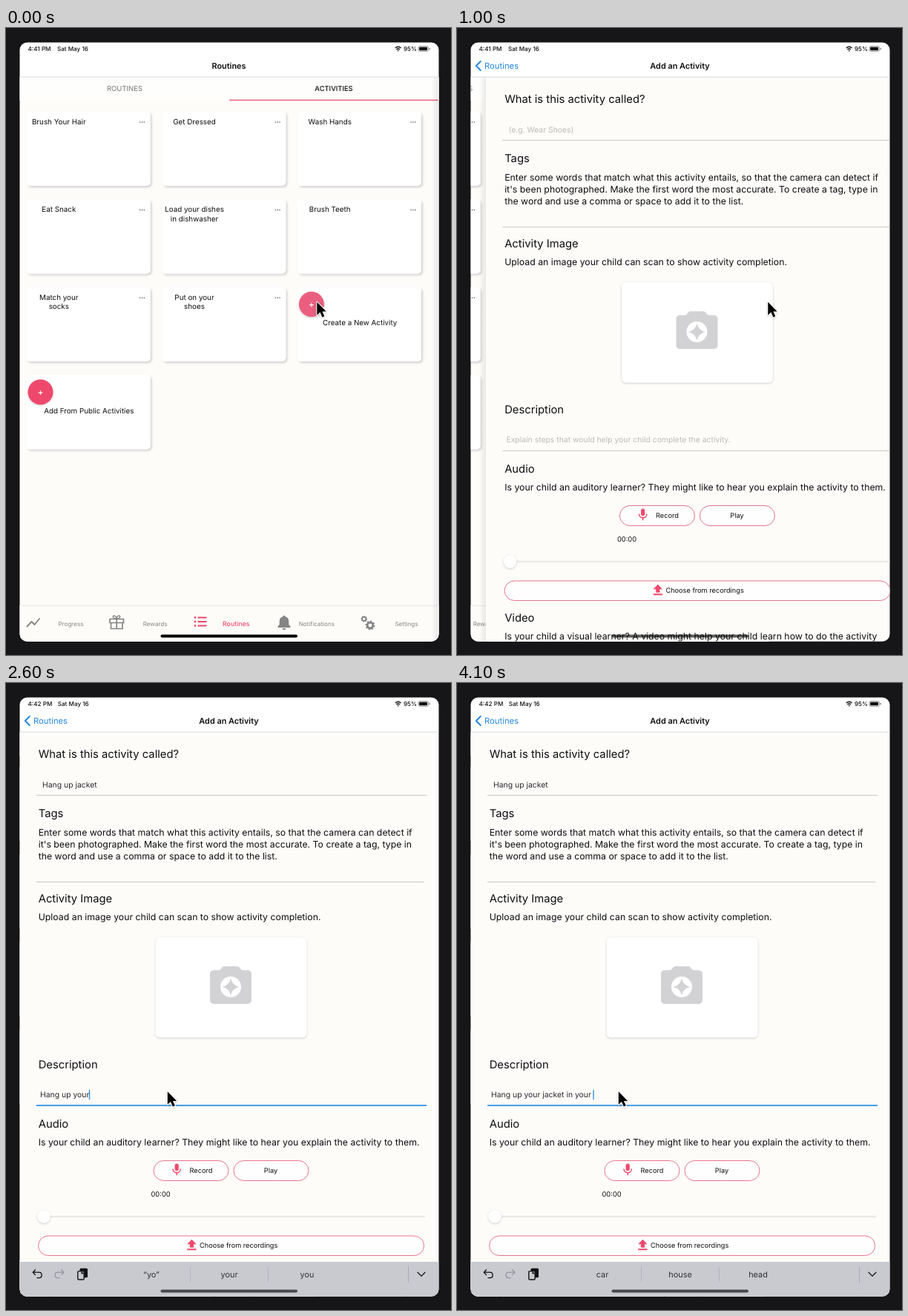
An HTML page for the animation above (4.2 s loop, 600 by 846 pixels).

```html
<!DOCTYPE html>
<html lang="en">
<head>
<meta charset="utf-8">
<title>Add an Activity</title>
<style>
  html, body { margin: 0; width: 100%; height: 100%; overflow: hidden; background: #161517; }
  svg { display: block; width: 600px; height: 846px; }
  text { font-family: Inter, Roboto, sans-serif; white-space: pre; text-rendering: geometricPrecision; }
</style>
</head>
<body>
<svg id="stage" viewBox="0 0 600 846" width="600" height="846"></svg>
<script>
const PINK = '#ee4a6d', BLUE = '#2f95e5', INK = '#0e0e10', GREY = '#858585', PAPER = '#fdfcf9';
const LOOP = 4200, STEP = 100, WIDTH = 564;

// y is the middle of the capitals
const text = (x, y, size, str, o = {}) =>
  `<text x="${x}" y="${y + size * 0.36}" font-size="${size}" fill="${o.fill || INK}"` +
  ` text-anchor="${o.anchor || 'start'}" font-weight="${o.weight || 400}"` +
  `${o.id ? ` id="${o.id}"` : ''}>${str}</text>`;
const mid = (x, y, size, str, o = {}) => text(x, y, size, str, { ...o, anchor: 'middle' });
const rect = (x, y, w, h, fill, more = '') =>
  `<rect x="${x}" y="${y}" width="${w}" height="${h}" fill="${fill}" ${more}/>`;
const dot = (x, y, r, fill, more = '') => `<circle cx="${x}" cy="${y}" r="${r}" fill="${fill}" ${more}/>`;
const path = (d, fill, more = '') => `<path d="${d}" fill="${fill}" ${more}/>`;
const line = (d, color, w = 1, more = '') =>
  `<path d="${d}" fill="none" stroke="${color}" stroke-width="${w}" ${more}/>`;
const group = (id, body) => `<g id="${id}">${body}</g>`;
const ROUND = 'stroke-linecap="round" stroke-linejoin="round"';

const defs = `<defs>
  <clipPath id="screen"><rect x="18.5" y="19.5" width="565" height="808.3" rx="10"/></clipPath>
  <filter id="cardShade" x="-10%" y="-10%" width="125%" height="130%">
    <feDropShadow dx="2" dy="2" stdDeviation="1.5" flood-opacity=".17"/></filter>
  <filter id="softShade" x="-50%" y="-50%" width="200%" height="200%">
    <feDropShadow dx="0" dy="1" stdDeviation="1.4" flood-opacity=".22"/></filter>
  <linearGradient id="edge"><stop offset="0" stop-opacity="0"/><stop offset="1" stop-opacity=".08"/></linearGradient>
</defs>`;

function card(col, row, lines) {
  const x = 27.5 + col * 182.7, y = 112.5 + row * 118.5;
  return rect(x, y, 167, 100.5, '#fff', 'rx="5" filter="url(#cardShade)"') +
    lines.map((s, i) => mid(x + 43.8, y + 13.8 + i * 12.2, 9.83, s)).join('') +
    [-2.8, 0, 2.8].map(d => dot(x + 156 + d, y + 14.4, 0.75, '#444')).join('');
}

function addCard(col, row, label, fill) {
  const x = 27.5 + col * 182.7, y = 112.5 + row * 118.5, cx = x + 19, cy = y + 23.3;
  return rect(x, y, 167, 100.5, '#fff', 'rx="5" filter="url(#cardShade)"') +
    dot(cx, cy, 17, fill, 'filter="url(#softShade)"') +
    line(`M${cx - 2.8} ${cy + .8}h5.6m-2.8 -2.8v5.6`, '#fff', 1.1) +
    mid(x + 84.3, y + 48, 9.8, label);
}

const gear = (x, y, r) =>
  `<circle cx="${x}" cy="${y}" r="${r * 0.62}" fill="none" stroke="${GREY}" stroke-width="${r * 0.44}"/>` +
  `<circle cx="${x}" cy="${y}" r="${r * 0.9}" fill="none" stroke="${GREY}" stroke-width="${r * 0.3}"` +
  ` pathLength="16" stroke-dasharray="1 1"/>`;

function tabBar() {
  const label = (x, s) => mid(x, 803.7, 8.1, s, { fill: GREY });
  const bullets = [795.5, 801, 806.5].map(y =>
    dot(255, y, 1.4, PINK) + line(`M258.5 ${y}h12`, PINK, 2)).join('');
  return rect(18, 779, 566, 50, PAPER) + line('M18 779.5h566', '#ecebe8', 1.5) +
    line('M28.5 807.5L34.5 801L38.5 805L45 797', GREY, 1.9, ROUND) + label(87.5, 'Progress') +
    line('M140 797.5h18.5v5h-18.5zM141.5 802.5v8h15.5v-8M149.2 797.5v13', GREY, 1.7) +
    line('M149 797c-5 0 -6 -4 -3.3 -4c2 0 3.3 2.5 3.3 4c0 -1.5 1.3 -4 3.3 -4c2.7 0 1.7 4 -3.3 4', GREY, 1.4) +
    label(201.2, 'Rewards') + bullets +
    mid(310.3, 803.5, 8.8, 'Routines', { fill: PINK, weight: 500 }) +
    path('M366.5 809v-1.5l2.2 -2.4v-4.8c0 -3.4 1.9 -5.3 4.7 -6c0 -2 3.2 -2 3.2 0c2.8 .7 4.7 2.6 4.7 6v4.8l2.2 2.4v1.5zM372.6 810h4.8c0 2.8 -4.8 2.8 -4.8 0z', GREY) +
    label(418.8, 'Notifications') +
    gear(482.8, 797.3, 4.2) + gear(491, 806, 6.2) + label(540, 'Settings');
}

const list = () => rect(18, 66, 566, 763, PAPER) + rect(18, 67, 566, 31, '#fefefd') +
  mid(160, 82, 9.5, 'ROUTINES', { fill: '#777' }) + mid(442, 82, 9.35, 'ACTIVITIES', { weight: 500 }) +
  rect(301, 96.6, 283, 1.6, '#ea6883') +
  card(0, 0, ['Brush Your Hair']) + card(1, 0, ['Get Dressed']) + card(2, 0, ['Wash Hands']) +
  card(0, 1, ['Eat Snack']) + card(1, 1, ['Load your dishes', 'in dishwasher']) + card(2, 1, ['Brush Teeth']) +
  card(0, 2, ['Match your', 'socks']) + card(1, 2, ['Put on your', 'shoes']) +
  addCard(2, 2, 'Create a New Activity', '#ea5f80') + addCard(0, 3, 'Add From Public Activities', PINK) +
  tabBar();

const pill = (x, y, w, h) => rect(x, y, w, h, '#fffefe', `rx="${h / 2}" stroke="#e5758e"`);

function camera() {
  const star = 'M303 398.5Q305 408 314.5 410Q305 412 303 421.5Q301 412 291.5 410Q301 408 303 398.5z';
  return rect(201.8, 343.3, 203.5, 135, '#fff', 'rx="5.5" filter="url(#softShade)"') +
    rect(275, 387.5, 56, 45.5, '#d2d1d4', 'rx="5"') +
    path('M286.5 389l5.5 -5.8q1 -1 2.5 -1h17q1.5 0 2.5 1l5.5 5.8z', '#d2d1d4') +
    dot(303, 410, 14, '#fff') + path(star, '#d2d1d4');
}

function sheet() {
  const head = (y, s) => text(43.7, y, 14.8, s);
  const body = (y, s) => text(43.7, y, 12.3, s);
  const rule = (y, x2, id) => line(`M41 ${y}H${x2}`, '#c9c8c6', 1, id ? `id="${id}"` : '');
  return rect(9.5, 67, 9, 762, 'url(#edge)') + rect(18.5, 67, 566, 762, PAPER) +
    head(95.7, 'What is this activity called?') + rule(151.5, 567, 'nameRule') +
    head(176, 'Tags') +
    body(201.2, 'Enter some words that match what this activity entails, so that the camera can detect if') +
    body(217.2, "it's been photographed. Make the first word the most accurate. To create a tag, type in") +
    body(233.2, 'the word and use a comma or space to add it to the list.') + rule(268.5, 564) +
    head(290.7, 'Activity Image') + body(315.3, 'Upload an image your child can scan to show activity completion.') +
    camera() + head(514.7, 'Description') + rule(570.5, 567, 'descRule') +
    text(49, 137.3, 10.4, '', { id: 'name' }) + text(46, 555.3, 10.4, '', { id: 'desc' }) +
    rect(41, 150, 526, 1.8, BLUE, 'id="nameLine"') + rect(41, 569.1, 526, 1.8, BLUE, 'id="descLine"') +
    rect(0, 0, 1.4, 13, BLUE, 'id="caret"') +
    head(595, 'Audio') +
    body(620, 'Is your child an auditory learner? They might like to hear you explain the activity to them.') +
    pill(199, 644.5, 101, 27) + pill(307, 644.5, 101, 27) +
    rect(227.6, 648.5, 5.2, 9.6, PINK, 'rx="2.6"') +
    line('M225 655.5c0 7 10.4 7 10.4 0M230.2 660.8v3.4', PINK, 1.5) +
    mid(263, 657.8, 9.2, 'Record') + mid(357, 657.8, 9.2, 'Play') +
    text(195.5, 690, 9.3, '00:00') +
    line('M52 720H565', '#ebeae8', 2.4) + dot(51, 719.8, 8.6, '#fff', 'filter="url(#softShade)"') +
    pill(43.6, 746, 520, 26.5) +
    path('M250.4 750.8l6.2 6.4h-3.6v4.6h-5.2v-4.6h-3.6zM244.2 763.3h12.4v1.9h-12.4z', PINK) +
    text(261, 759, 9.2, 'Choose from recordings') +
    head(795.5, 'Video') + body(820.3, 'Is your child a visual learner? A video might help your child learn how to do the activity');
}

function keyboard() {
  const undo = 'M39.5 791.8l-3.2 3.4l3.2 3.4M36.8 795.2h7.6c5 0 5 7.4 0 7.4h-2.4';
  return rect(18, 781, 566, 60, '#c9cad0') + line(undo, INK, 1.3, ROUND) +
    line(undo, '#94969d', 1.3, ROUND + ' transform="translate(114.2 0) scale(-1 1)"') +
    rect(99.5, 789.8, 10.5, 12.5, '#111', 'rx="1.5"') +
    rect(96.8, 793.6, 8.4, 11.4, '#c9cad0', 'rx="1.2" stroke="#111" stroke-width="1.4"') +
    path('M101.5 793.6l3.7 3.7h-3.7z', '#111') +
    line('M248.5 788v20M353.5 788v20', '#b3b5bc') + line('M542.5 787v22', '#a9abb2') +
    line('M555 795.2l5 5l5 -5', '#222', 1.4, ROUND) +
    [196, 301, 406].map((x, i) => mid(x, 797.7, 10.9, '', { id: 'hint' + i, fill: '#333' })).join('');
}

const header = () => rect(18, 19, 566, 48, '#fff') + line('M18 66.2h566', '#d9d9d9') +
  text(29.5, 28, 8.1, '', { id: 'clock', weight: 500 }) + text(69, 28, 8.1, 'Sat May 16', { id: 'date', weight: 500 }) +
  text(536, 28, 8.1, '95%', { weight: 500 }) +
  line('M524.8 27.1q3.9 -3.6 7.8 0M526.4 29q2.3 -2.1 4.6 0', INK, 1.3) + dot(528.7, 30.6, 0.95, INK) +
  rect(556, 24.7, 13.6, 6.6, 'none', 'rx="1.8" stroke="#777" stroke-width=".8"') +
  rect(557.1, 25.8, 11, 4.4, '#111', 'rx=".9"') + rect(570.6, 26.8, 1.1, 2.6, '#777', 'rx=".5"') +
  mid(300.5, 51, 10.9, 'Routines', { id: 'oldTitle', weight: 600 }) +
  mid(300.5, 51, 10.9, 'Add an Activity', { id: 'newTitle', weight: 600 }) +
  text(37, 51, 11.25, 'Routines', { id: 'back', fill: '#2387e0' }) +
  line('M31.8 45l-6 6l6 6', '#2387e0', 1.9, ROUND + ' id="chevron"');

const $ = id => document.getElementById(id);
$('stage').innerHTML = defs + rect(0, 0, 600, 846, '#161517') +
  `<g clip-path="url(#screen)">` + group('list', list()) + group('sheet', sheet()) + header() +
  group('keys', keyboard()) + rect(208.5, 818.6, 184.5, 4, '#000', 'rx="2" id="home"') + '</g>' +
  group('pointer', path('M0 0V17.6L4.2 13.8L7 20.4L10 19.1L7.2 12.7H12.4Z', '#000',
    'stroke="#fff" stroke-width="2" stroke-linejoin="round" paint-order="stroke" filter="url(#softShade)"'));

// [from ms, text, hints]
const nameSteps = [
  [0, '', ''], [1700, 'Ha', '“Ha”'], [1800, 'Hang ', '“Hang”'], [1900, 'Hang up', '“up”'],
  [2000, 'Hang up ja', '“ja”,jacket,jack'], [2100, 'Hang up jacket', '“jacket”,jackets']
];
const descSteps = [
  [0, '', ''], [2300, 'Hang', '“Hang”'], [2400, 'Hang up ', '“up”'], [2500, 'Hang up yo', '“yo”,your,you'],
  [2600, 'Hang up your', '“yo”,your,you'], [2700, 'Hang up your ', 'own,house,head'],
  [2800, 'Hang up your j', '“j”,just,jacket'], [2900, 'Hang up your ja', '“ja”,jacket,jack'],
  [3000, 'Hang up your jac', '“jac”,jacket,jack'], [3100, 'Hang up your jacke', '“jacke”,jacket,jackets'],
  [3200, 'Hang up your jacket ', 'and,in,on'], [3300, 'Hang up your jacket in', '“in”,into,inside'],
  [3400, 'Hang up your jacket in ', 'the,your,my'], [3500, 'Hang up your jacket in yo', '“yo”,your,you'],
  [3600, 'Hang up your jacket in you', '“you”,your,you’re'], [3700, 'Hang up your jacket in your', '“your”,yours,you'],
  [3800, 'Hang up your jacket in your ', 'car,house,head']
];
const pointerSteps = [
  [0, 419.3, 369.8], [1400, 318, 246], [1500, 222.3, 131.2], [2200, 217.8, 551.2]
];
const at = (steps, t) => steps.filter(s => s[0] <= t).pop();
const move = (id, x, y = 0) => $(id).setAttribute('transform', `translate(${x} ${y})`);
const fade = (id, v) => $(id).setAttribute('opacity', Math.max(0, Math.min(1, v)));

function field(id, value, hint, focused) {
  $(id).textContent = value || hint;
  $(id).setAttribute('fill', value ? '#2a2a2c' : '#bcbbb9');
  fade(id + 'Line', +focused);
  fade(id + 'Rule', +!focused);
}

function draw(t) {
  const gap = Math.max(0, 409.5 * Math.exp(-t / 375) + 162.5 * Math.exp(-t / 50) - 8);
  const done = 1 - gap / WIDTH;
  move('sheet', gap);
  move('list', -0.3 * WIDTH * done);
  fade('oldTitle', 1 - done * 2);
  fade('newTitle', done * 1.2);
  fade('back', done * 1.15);
  fade('chevron', (done - 0.7) * 5);

  const [, name, nameHints] = at(nameSteps, t), [, desc, descHints] = at(descSteps, t);
  const inName = t >= 1500 && t < 2200, inDesc = t >= 2200;
  field('name', name, '(e.g. Wear Shoes)', inName);
  field('desc', desc, 'Explain steps that would help your child complete the activity.', inDesc);
  fade('caret', +(inName || inDesc));
  const typed = inDesc ? desc : name;
  const end = typed ? $(inDesc ? 'desc' : 'name').getComputedTextLength() : 0;
  move('caret', (inDesc ? 46 : 49) + end - 0.5, inDesc ? 549 : 131);

  const hints = (inDesc ? descHints : nameHints).split(',');
  for (let i = 0; i < 3; i++) $('hint' + i).textContent = hints[i] || '';
  move('keys', 0, t < 1600 ? 60 : t < 1700 ? 22 : 0);
  fade('home', t < 100 ? 1 : t < 700 ? 0.82 : 0.64);

  $('clock').textContent = t < 2200 ? '4:41 PM' : '4:42 PM';
  move('date', t < 2200 ? 0 : 0.8);
  const [, px, py] = at(pointerSteps, t);
  move('pointer', px, py);
}

const start = performance.now();
function tick() {
  const t = (performance.now() - start) % LOOP;
  draw(Math.floor(t / STEP) * STEP);
  requestAnimationFrame(tick);
}
tick();
</script>
</body>
</html>
```
